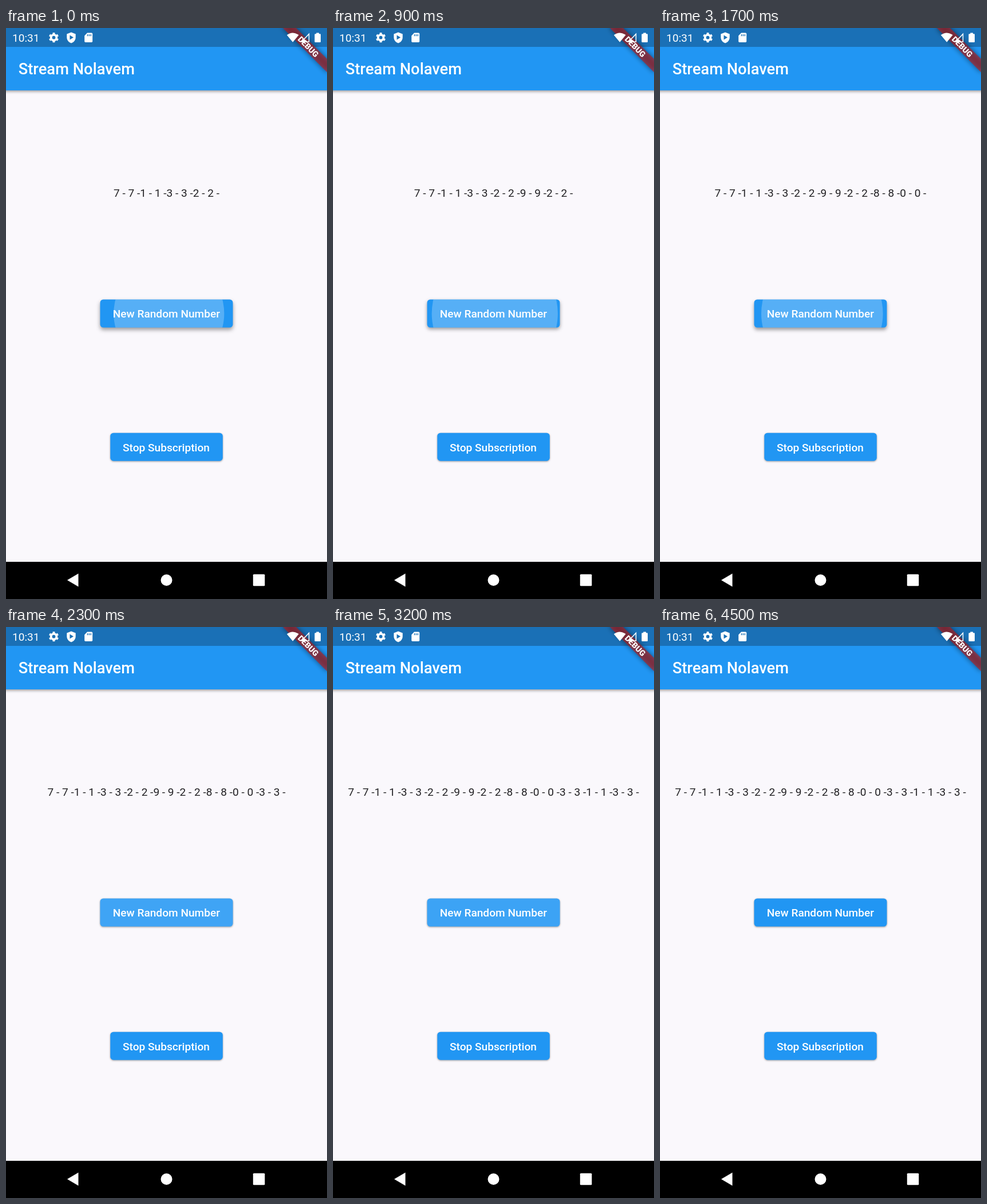
An HTML page that plays this animation: 561 by 998 pixels, repeating every 4600 ms.

```html
<!DOCTYPE html>
<html lang="en">
<head>
<meta charset="utf-8">
<title>Random number stream</title>
<style>
  html, body { margin: 0; width: 100%; height: 100%; overflow: hidden; background: #faf8fc; }
  svg { display: block; width: 561px; height: 998px; }
  text { font: 500 19.1px Roboto, sans-serif; fill: #fff; }
  .mid { text-anchor: middle; }
  .plain { font-weight: 400; }
</style>
</head>
<body>
<svg viewBox="0 0 561 998">
  <defs>
    <clipPath id="buttonClip"><rect x="164.5" y="474.5" width="232" height="49" rx="5.5"/></clipPath>
    <filter id="soft" x="-30%" y="-100%" width="160%" height="300%"><feGaussianBlur stdDeviation="5"/></filter>
  </defs>

  <rect width="561" height="998" fill="#faf8fc"/>
  <rect x="-20" width="601" height="109" fill="#2196f3" style="filter:drop-shadow(0 2.5px 2.5px rgba(0,0,0,.38))"/>
  <rect width="561" height="33" fill="#1a70b6"/>
  <text x="21.8" y="81" style="font-size:27.3px">Stream Nolavem</text>

  <text id="numbers" class="mid plain" x="280.5" y="295" style="fill:#212023"></text>

  <rect id="button" x="164.5" y="474.5" width="232" height="49" rx="5.5" fill="#2196f3"/>
  <g id="ripples" clip-path="url(#buttonClip)" fill="#fff"></g>
  <text class="mid" x="280.3" y="506">New Random Number</text>

  <rect id="stop" x="182.3" y="707.7" width="196.5" height="49" rx="5.5" fill="#2196f3"/>
  <text class="mid" x="280" y="739.5">Stop Subscription</text>

  <!-- corner ribbon -->
  <g transform="translate(561 0) rotate(45)">
    <rect x="-54.5" y="38.2" width="109" height="16.4" fill-opacity=".5" filter="url(#soft)"/>
    <rect x="-54.5" y="38.2" width="109" height="16.4" fill="#b71c1c" fill-opacity=".627"/>
    <text class="mid" y="51.2" style="font-size:13.9px;font-weight:900">DEBUG</text>
  </g>

  <!-- status bar -->
  <text class="plain" x="11" y="24">10:31</text>
  <g fill="none" stroke="#fff">
    <circle cx="83.5" cy="16.7" r="4.8" stroke-width="3.8"/>
    <circle cx="83.5" cy="16.7" r="7.2" stroke-width="2.8" pathLength="12" stroke-dasharray="1 1" stroke-dashoffset="-.5"/>
  </g>
  <g fill="#fff">
    <path d="M114 7.5l7.7 3v5.7c0 5-3.3 8.7-7.7 10.3c-4.400-1.600-7.700-5.300-7.700-10.300v-5.700z"/>
    <path d="M111.500 12.500v8l6.500-4z" fill="#1a70b6"/>
    <path d="M142 8.500h7.500q1.700 0 1.700 1.700v13.100q0 1.700-1.700 1.700h-10.600q-1.700 0-1.700-1.700v-9.900z"/>
    <path d="M142.500 11v3.200m2.900-3.200v3.200m2.900-3.200v3.200" stroke="#1a70b6" stroke-width="1.400"/>
    <path d="M490.800 12.300q10.400-7.700 20.800 0l-10.400 12.400z"/>
    <path d="M514.800 24.800l7.200-7.700v7.700z"/>
    <path d="M516.500 24.200l13-13.800v13.800z" fill="none" stroke="#fff" stroke-width="1.500"/>
    <path d="M542.300 8.500h4.700v1.700h1.800q1.200 0 1.200 1.200v12.400q0 1.200-1.200 1.200h-8.200q-1.200 0-1.200-1.200v-12.400q0-1.200 1.200-1.200h1.700z"/>
  </g>

  <!-- navigation bar -->
  <rect y="933" width="561" height="65"/>
  <g fill="#fff">
    <path d="M107 965l19.500-11.500v23z"/>
    <circle cx="280.5" cy="965" r="10"/>
    <rect x="431.800" y="954.800" width="20.500" height="20.500" rx="1.500"/>
  </g>
</svg>
<script>
const LOOP = 4600, STEP = 100, PRESS = 90;
const drawn = [7, 1, 3, 2, 9, 2, 8, 0, 3, 1, 3];
const releases = [-70, 370, 800, 1205, 1610, 2012, 2428, 2900];
const touchX = 294, centerX = 280.5, centerY = 499, startR = 35, endR = 125;

const $ = id => document.getElementById(id);
const clamp = v => Math.min(1, Math.max(0, v));
const mix = (a, b, k) => a + (b - a) * k;

// cubic-bezier(.25, .1, .25, 1)
function ease(x) {
  let lo = 0, hi = 1;
  for (let i = 0; i < 20; i++) {
    const u = (lo + hi) / 2;
    if (.75 * u * (1 - u) + u ** 3 < x) lo = u; else hi = u;
  }
  return .3 * lo * (1 - lo) ** 2 + 3 * lo * lo * (1 - lo) + lo ** 3;
}

function elevate(node, e) {
  node.style.filter = `drop-shadow(0 ${.75 * e}px ${.5 * e + .6}px rgba(0,0,0,.38))`;
}

const ripples = releases.map(() => {
  const c = document.createElementNS('http://www.w3.org/2000/svg', 'circle');
  c.setAttribute('cy', centerY);
  return $('ripples').appendChild(c);
});

function draw(t) {
  const count = 3 + releases.filter(r => r <= t).length;
  $('numbers').textContent = drawn.slice(0, count).map(n => `${n} - ${n} -`).join('');

  let lift = 0;
  releases.forEach((release, i) => {
    const since = t - release, held = since + PRESS;
    const grow = ease(clamp(since < 0 ? held / 1000 : PRESS / 1000 + since / 225));
    const alpha = .24 * clamp(held / 75) * clamp((375 - since) / 150);
    ripples[i].setAttribute('cx', mix(touchX, centerX, grow));
    ripples[i].setAttribute('r', mix(startR, endR, grow));
    ripples[i].setAttribute('opacity', alpha);
    const fall = clamp(since / 200);
    lift = Math.max(lift, clamp(held / PRESS) * (1 - fall * fall * (3 - 2 * fall)));
  });
  elevate($('button'), 2 + 6 * lift);
}

function tick() {
  draw(Math.floor(performance.now() % LOOP / STEP) * STEP);
  requestAnimationFrame(tick);
}

elevate($('stop'), 2);
tick();
</script>
</body>
</html>
```
